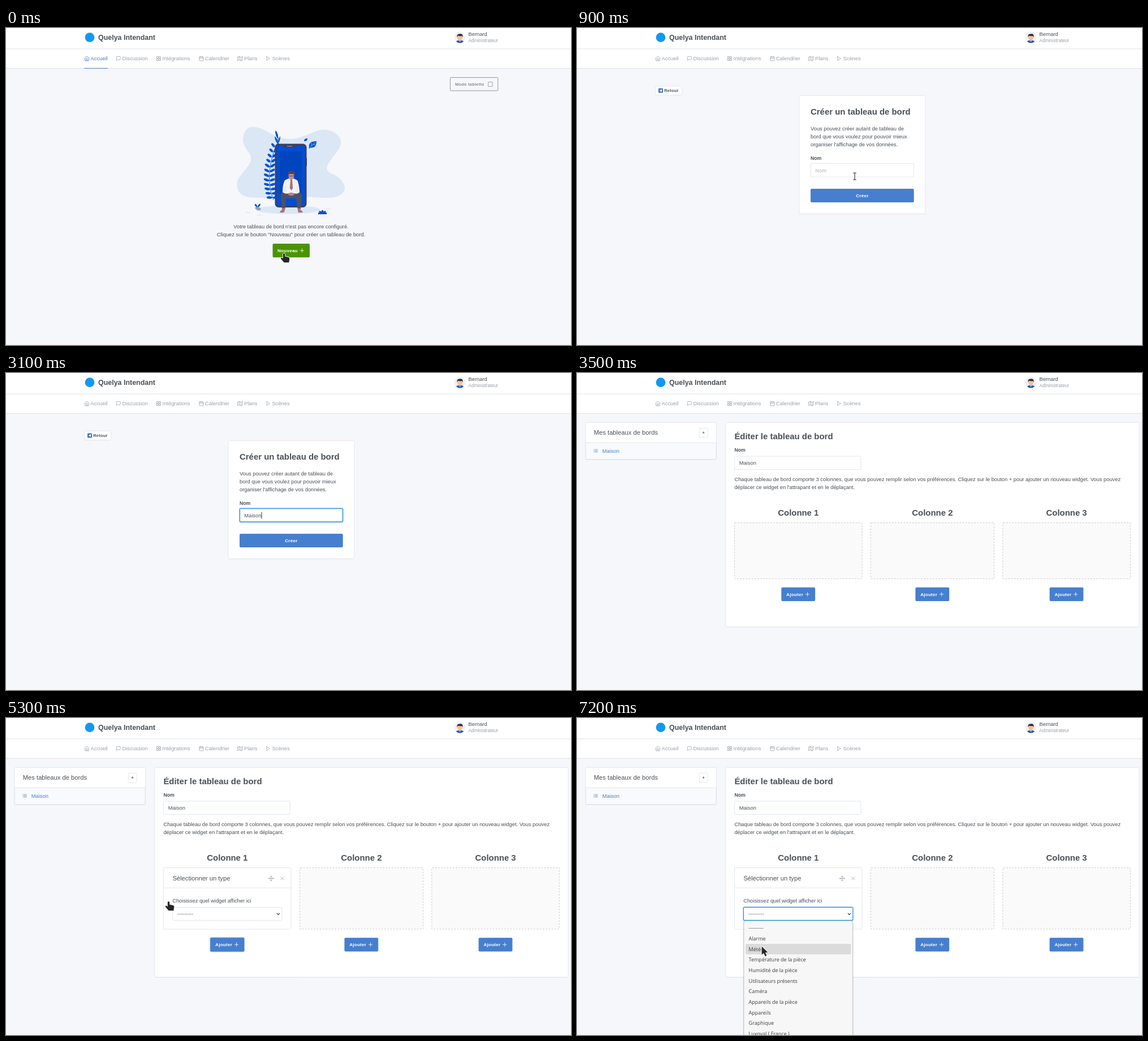
Animation of 999 by 560 pixels, one loop 8000 ms. Source, as an HTML page with a canvas:

```html
<!DOCTYPE html>
<html lang="fr">
<head>
<meta charset="utf-8">
<title>Tableau de bord</title>
<style>
html, body { margin: 0; width: 100%; height: 100%; overflow: hidden; background: #f5f7fb; }
canvas { display: block; width: 999px; height: 560px; }
</style>
</head>
<body>
<canvas id="stage"></canvas>
<script>
const W = 999, H = 560, LOOP = 8000;
const BLUE = '#467fcf', TEXT = '#495057', MUTED = '#9aa0ac', LINE = '#dde2ea', FOCUS = '#1991eb';
const INK = '#0051d6', BLOB = '#dbe7f4';
const SANS = '"Liberation Sans", Arial, sans-serif';
const LIST = '"Open Sans", "Noto Sans", sans-serif';
const BODY = 9.33, HEAD = 14.93, CARD = 11.2, BTN = 8.09, SMALL = 7.47;

const canvas = document.getElementById('stage');
const c = canvas.getContext('2d');
const dpr = window.devicePixelRatio || 1;
canvas.width = W * dpr;
canvas.height = H * dpr;

const ICONS = {
  home: 'M3 9l9-7 9 7v11a2 2 0 0 1-2 2H5a2 2 0 0 1-2-2zM9 22V12h6v10',
  chat: 'M21 15a2 2 0 0 1-2 2H7l-4 4V5a2 2 0 0 1 2-2h14a2 2 0 0 1 2 2z',
  grid: 'M3 3h7v7H3zM14 3h7v7h-7zM14 14h7v7h-7zM3 14h7v7H3z',
  calendar: 'M5 4h14a2 2 0 0 1 2 2v14a2 2 0 0 1-2 2H5a2 2 0 0 1-2-2V6a2 2 0 0 1 2-2zM16 2v4M8 2v4M3 10h18',
  map: 'M1 6v16l7-4 8 4 7-4V2l-7 4-8-4-7 4zM8 2v16M16 6v16',
  play: 'M5 3l14 9-14 9V3z',
  plus: 'M12 4v16M4 12h16',
  list: 'M8 6h13M8 12h13M8 18h13M3 6h1M3 12h1M3 18h1',
  move: 'M5 9l-3 3 3 3M9 5l3-3 3 3M15 19l-3 3-3-3M19 9l3 3-3 3M2 12h20M12 2v20',
  close: 'M19 5L5 19M5 5l14 14',
  square: 'M3 2h18v20H3z'
};

const POINTERS = {
  hand: 'M-1.7 1.2Q0 -1.2 1.7 1.2V5.6L8 7Q10 7.6 9.8 10L8.8 16.2H0L-5.6 9.6Q-6 7.4 -4 7.6L-1.7 9.2Z',
  arrow: 'M0 0V14.8L3.5 11.7L6.1 17.4L8.7 16.2L6.2 10.7H10.8Z',
  beam: 'M-2.8 -6H-.7L0 -5.4L.7 -6H2.8M0 -5.4V5.4M-2.8 6H-.7L0 5.4L.7 6H2.8'
};

function txt(s, x, y, size, color, { bold = false, align = 'left', spacing = 0, font = SANS } = {}) {
  c.font = `${bold ? 'bold ' : ''}${size}px ${font}`;
  c.letterSpacing = spacing + 'px';
  c.textAlign = align;
  c.fillStyle = color;
  c.fillText(s, x, y + size * 0.36);
}

function box(x, y, w, h, r, fill, stroke, lw = 0.8) {
  c.beginPath();
  c.roundRect(x, y, w, h, r);
  if (fill) { c.fillStyle = fill; c.fill(); }
  if (stroke) { c.strokeStyle = stroke; c.lineWidth = lw; c.stroke(); }
}

function oval(x, y, rx, ry, fill, rot = 0) {
  c.beginPath();
  c.ellipse(x, y, rx, ry, rot, 0, Math.PI * 2);
  c.fillStyle = fill;
  c.fill();
}

function path(d, fill, stroke, lw = 1) {
  const p = new Path2D(d);
  if (fill) { c.fillStyle = fill; c.fill(p); }
  if (stroke) { c.strokeStyle = stroke; c.lineWidth = lw; c.stroke(p); }
}

// Icon centred on x, y, drawn on a 24 unit grid.
function icon(name, x, y, color, size = BODY) {
  c.save();
  c.translate(x - size / 2, y - size / 2);
  c.scale(size / 24, size / 24);
  c.lineCap = c.lineJoin = 'round';
  path(ICONS[name], null, color, 2);
  c.restore();
}

function rule(x, y, w, color = '#dce0e7', h = 0.9) {
  c.fillStyle = color;
  c.fillRect(x, y, w, h);
}

function card(x, y, w, h) {
  box(x, y + 0.9, w, h, 2, 'rgba(0,0,0,.07)');
  box(x, y, w, h, 2, '#fff', LINE);
}

function button(label, x, y, w, tx, fill, plus) {
  box(x, y, w, 24.3, 2, fill);
  txt(label, tx, y + 12.1, BTN, '#fff', { bold: true, spacing: 0.24 });
  if (plus) icon('plus', x + w - 13.6, y + 12.1, '#fff', 9.6);
}

// Closed smooth curve through the midpoints of the given points.
function blob(pts, fill) {
  const mid = (a, b) => [(a[0] + b[0]) / 2, (a[1] + b[1]) / 2];
  c.beginPath();
  c.moveTo(...mid(pts[pts.length - 1], pts[0]));
  pts.forEach((p, i) => c.quadraticCurveTo(...p, ...mid(p, pts[(i + 1) % pts.length])));
  c.fillStyle = fill;
  c.fill();
}

function header(home) {
  c.fillStyle = '#fff';
  c.fillRect(0, 0, W, 71);
  rule(0, 36.5, W);
  rule(0, 70.8, W);
  oval(148, 16.6, 8.4, 8.4, '#1398f2');
  txt('Quelya Intendant', 163, 16.5, 12.44, TEXT, { bold: true });
  avatar();
  txt('Bernard', 817.5, 11, BODY, TEXT);
  txt('Administrateur', 817.5, 22.5, 8.17, MUTED);
  [['home', 143, 'Accueil', 149.5], ['chat', 198.8, 'Discussion', 205.5],
   ['grid', 270, 'Intégrations', 276.6], ['calendar', 345.4, 'Calendrier', 351.8],
   ['map', 414, 'Plans', 421], ['play', 463.6, 'Scènes', 470.5]
  ].forEach(([name, ix, label, x], i) => {
    const color = home && i === 0 ? BLUE : MUTED;
    icon(name, ix, 54, color);
    txt(label, x, 54, BODY, color);
  });
  if (home) rule(138.3, 70.7, 41.5, BLUE, 1);
}

function avatar() {
  c.save();
  c.beginPath();
  c.arc(802.5, 16.5, 10, 0, Math.PI * 2);
  c.clip();
  c.fillStyle = '#eff1f4';
  c.fillRect(792, 6, 21, 21);
  oval(802.5, 25.5, 7.5, 4, '#1557cf');
  path('M800 19h5v3l-2.5 2.5-2.5-2.5z', '#f3a987');
  oval(802.5, 16.5, 4.4, 4.9, '#f9bd9b');
  path('M797.5 16.5Q796.5 10 802 10.4Q808.5 9 807.5 16.5L806 14Q802 14.5 799 13.5Z', '#2b2b35');
  c.restore();
}

function fern() {
  const at = (u, a, b, d) => (1 - u) ** 2 * a + 2 * u * (1 - u) * b + u * u * d;
  path('M473 304Q456 262 478 206', null, INK, 0.9);
  for (let i = 0; i < 12; i++) {
    const u = 0.05 + i * 0.082;
    const x = at(u, 473, 456, 478), y = at(u, 304, 262, 206);
    const tilt = 0.05 + i * 0.075, size = i < 8 ? 5 : 4.2;
    for (const side of [-1, 1]) {
      const a = tilt * side;
      oval(x + side * 5.6 * Math.cos(tilt), y - 5.6 * Math.sin(tilt), size, 2.2, INK, -a);
    }
  }
  path('M480 206Q483 194 478 182', null, INK, 0.8);
  path('M481 196Q476 191 476 181Q482 187 481 196ZM482 206Q475 200 475 191Q482 198 482 206ZM481 204Q481 196 485 191Q485 200 481 204Z', INK);
}

function illustration() {
  blob([[419, 187], [430, 173], [455, 178], [480, 194], [510, 197], [535, 188], [560, 177], [587, 186],
    [595, 207], [575, 231], [563, 252], [590, 263], [603, 285], [583, 302], [530, 297], [460, 300],
    [415, 299], [405, 272], [424, 250], [437, 230], [419, 207]], BLOB);
  oval(499, 321, 57, 7.5, BLOB);
  fern();

  path('M536 211Q534 200 549 200Q549 212 539 211.5L535 213Z', INK);
  path('M537 211L547 202M540 208V203M543 206L547 206', null, BLOB, 0.6);
  path('M527 200Q527 195 533 195Q533 200 528 200Z', INK);

  rule(530, 229.5, 2, '#3a3d5c', 14);
  box(477, 206, 53, 109.5, 5, '#004ed2', '#3b3f63', 3);
  box(484, 218, 39, 76, 0, '#0045bd');
  box(490, 206.5, 24, 4.5, 2, '#3b3f63');
  rule(497, 208.3, 9, '#a9a9bd', 1);

  // Seated figure
  path('M489 289Q485 291 486 299L488 320H493.5L495 301H513L515.5 320H521L523 299Q523 291 518 289Z', '#4f5068');
  path('M488 318h5v3l-1 4.5q-5 1.5-8 0q0-2 3.5-3.5zM515.5 318h5v3.5q4 1.5 4 4q-4 1.5-8 0z', '#a9727b');
  path('M499 266L493 269Q489 276 489 290Q494 294 500 292H509Q516 294 519 290Q518 274 515 269L509 266Z', '#f1f1f6');
  path('M493.5 279V290M515 279V290', null, '#d3d4de', 0.7);
  path('M503 267h3l1.2 16-2.7 4-2.7-4z', '#a9727b');
  oval(504.4, 293.5, 5.5, 2.8, '#b9828a');
  oval(504.4, 261.5, 5, 6.5, '#c48e95');
  path('M498.3 260Q496 253 504 252.5Q513 252.5 510.5 260L508 258H501Z', '#5b4350');
  path('M500 261.5h9', null, '#3b3f63', 0.9);

  // Ground details
  oval(445.5, 319, 5.2, 2.8, '#9a9db1', 0.3);
  path('M444.5 317Q439 315 440 310.5Q445 312 444.5 317ZM445 317Q445 311 450 310.5Q450 315 445 317Z', INK);
  path('M552 326Q559 323.5 567 326V329H552Z', INK);
  oval(559.5, 324, 2, 2.6, INK);
  oval(556, 325, 3, 1.3, INK, 0.5);
  oval(563, 325, 3, 1.3, INK, -0.5);
  [[424, 325.5], [443, 330], [566, 319]].forEach(([x, y]) => rule(x, y, 8.5, '#dcdfe7', 1));
}

function homePage() {
  box(785.4, 87.4, 84.4, 23.4, 1.5, null, '#868e96', 0.9);
  txt('Mode tablette', 794, 99.2, SMALL, '#868e96', { bold: true, spacing: 0.28 });
  icon('square', 856.6, 99.3, '#868e96');
  illustration();
  txt("Votre tableau de bord n'est pas encore configuré.", 504, 350.8, BODY, TEXT, { align: 'center' });
  txt('Cliquez sur le bouton "Nouveau" pour créer un tableau de bord.', 504, 364.8, BODY, TEXT, { align: 'center' });
  button('Nouveau', 471.5, 381, 65.5, 480, '#4b9400', true);
}

function createPage(t) {
  box(138.5, 102.8, 47, 16.4, 2, 'rgba(0,0,0,.06)');
  box(138.5, 102.4, 47, 16, 2, '#fff', LINE);
  box(144, 106.4, 8, 8, 1, '#3c78c3');
  path('M150 108v5l-4.4-2.5z', '#fff');
  txt('Retour', 154.2, 110.8, SMALL, TEXT, { bold: true, spacing: 0.22 });

  card(392.9, 119.4, 222.8, 208.8);
  txt('Créer un tableau de bord', 413, 147.8, HEAD, TEXT, { bold: true });
  ['Vous pouvez créer autant de tableau de', 'bord que vous voulez pour pouvoir mieux',
   "organiser l'affichage de vos données."
  ].forEach((s, i) => txt(s, 413, 178 + i * 14, BODY, TEXT));
  txt('Nom', 413, 229.6, 8.71, TEXT, { bold: true });

  box(413.2, 239.3, 182.3, 23.8, 2, '#fff', LINE, 0.9);
  const focus = Math.min(1, Math.max(0, (t - 1100) / 300));
  if (focus) {
    c.globalAlpha = focus;
    box(413.2, 239.3, 182.3, 23.8, 2, null, 'rgba(70,127,207,.3)', 2.4);
    box(413.2, 239.3, 182.3, 23.8, 2, null, FOCUS, 1.1);
    c.globalAlpha = 1;
  }
  const typed = t < 2100 ? '' : 'Maison'.slice(0, 1 + Math.floor((t - 2100) / 200));
  if (typed) {
    txt(typed, 421.3, 251.5, BODY, TEXT);
    rule(421.5 + c.measureText(typed).width, 245.5, 0.9, '#222', 12);
  } else {
    txt('Nom', 421.3, 251.5, BODY, '#adb5bd');
  }

  box(413, 284, 182.7, 24, 2, BLUE);
  txt('Créer', 504.4, 296, BTN, '#fff', { bold: true, spacing: 0.24, align: 'center' });
}

function editPage(t) {
  const added = t >= 4500, grow = added ? 9.4 : 0;

  card(15, 87.4, 231.5, 65.4);
  box(15.4, 123, 230.6, 29.4, 0, '#f8fafd', LINE);
  txt('Mes tableaux de bords', 29.8, 105.3, CARD, TEXT);
  box(216.2, 97.4, 15, 16.4, 1.5, '#fff', LINE);
  txt('+', 223.6, 105.6, SMALL, TEXT, { bold: true, align: 'center' });
  icon('list', 33, 137.4, BLUE, 9);
  txt('Maison', 44.8, 138, BODY, BLUE);

  card(262.9, 87.4, 731, 361 + grow);
  txt('Éditer le tableau de bord', 278.4, 111.5, HEAD, TEXT, { bold: true });
  txt('Nom', 278.4, 136.3, 8.71, TEXT, { bold: true });
  box(278.6, 147, 223.4, 23.6, 2, '#fff', LINE, 0.9);
  txt('Maison', 286.8, 158.6, BODY, TEXT);
  txt('Chaque tableau de bord comporte 3 colonnes, que vous pouvez remplir selon vos préférences. Cliquez sur le bouton + pour ajouter un nouveau widget. Vous pouvez', 278.4, 187.6, BODY, TEXT);
  txt("déplacer ce widget en l'attrapant et en le déplaçant.", 278.4, 201.6, BODY, TEXT);

  [[278.5, 225.5, 391.3], [519.4, 218.2, 628.4], [752.8, 225.6, 865.6]].forEach(([x, w, mid], i) => {
    txt('Colonne ' + (i + 1), mid, 247, HEAD, TEXT, { bold: true, align: 'center' });
    if (added && i === 0) {
      widget(t);
    } else {
      c.setLineDash([2.6, 2.6]);
      box(x, 264.5, w, 99 + grow, 1, '#fafafa', '#bcbcbc', 0.8);
      c.setLineDash([]);
    }
    const by = 378.8 + grow, bx = mid - 30;
    if (i === 0 && t >= 4400) box(bx - 0.9, by - 0.9, 61.6, 26.1, 3, 'rgba(70,127,207,.5)');
    const hover = i === 0 && t >= 4300 && t < 4700;
    button('Ajouter', bx, by, 59.8, bx + 8.8, hover ? '#316cbe' : BLUE, true);
  });
  if (t >= 5800) dropdown(t);
}

function widget(t) {
  box(278.5, 264.5, 225.4, 108.6, 2, '#fff', LINE, 0.9);
  rule(278.5, 299.7, 225.4, LINE, 0.8);
  txt('Sélectionner un type', 294.4, 283, CARD, TEXT);
  icon('move', 468.8, 283.4, MUTED, 10.5);
  icon('close', 488.4, 283.4, MUTED, 9);
  txt('Choisissez quel widget afficher ici', 294.2, 322.8, BODY, TEXT);
  const focus = t >= 5700;
  if (focus) box(294.4, 334.4, 193.4, 23, 2, null, 'rgba(70,127,207,.3)', 2.4);
  box(294.4, 334.4, 193.4, 23, 2, '#fff', focus ? FOCUS : LINE, focus ? 1.1 : 0.9);
  txt('---------', 302.8, 346, BODY, TEXT);
  path('M479 345l2.4 2.4 2.4-2.4', null, '#333', 1.1);
}

function dropdown(t) {
  box(293.8, 358.6, 194.8, 220, 4, 'rgba(0,0,0,.1)');
  box(294.8, 358.3, 192.8, 220, 4, '#f7f7f7', '#b4b4b4', 0.8);
  const row = t < 6300 ? 0 : t < 7000 ? 1 : 2;
  box(298, 361.8 + row * 18.65, 186.6, 18.3, 3, '#dbdbdb');
  ['---------', 'Alarme', 'Météo', 'Température de la pièce', 'Humidité de la pièce', 'Utilisateurs présents',
   'Caméra', 'Appareils de la pièce', 'Appareils', 'Graphique', 'Luxoval ( France )'
  ].forEach((s, i) => txt(s, 303.6, 371.2 + i * 18.65, 9, '#3d3d3d', { font: LIST }));
}

// Pointer way-points: time, x, y.
const TRACK = [
  [0, 491.5, 398], [100, 491.5, 397], [300, 491, 399], [500, 491, 380], [700, 491, 315], [800, 491, 282],
  [900, 491, 262], [1000, 491, 255], [1100, 491, 252], [2100, 491, 252],
  [4300, 389, 396], [4500, 386, 394], [4800, 335, 358], [5000, 295, 331], [5100, 286, 325],
  [5300, 287.5, 324], [5500, 305, 336], [5700, 328, 346], [5900, 330, 347], [6000, 330, 348],
  [6100, 331, 362], [6200, 331, 378], [6300, 331, 383], [6400, 331, 386], [6800, 331, 386],
  [6900, 330, 390], [7000, 328, 397], [7100, 327, 402], [7200, 326.7, 403.5], [8000, 326.7, 403.5]
];

function pointerKind(t, y) {
  if (t < 300) return 'hand';
  if (t < 2100) return y < 264 ? 'beam' : y > 284 && y < 308 ? 'hand' : 'arrow';
  return t < 5600 ? 'hand' : 'arrow';
}

function pointer(t) {
  if (t >= 2100 && t < 4300) return;
  const i = TRACK.findIndex((p, n) => n === TRACK.length - 2 || t < TRACK[n + 1][0]);
  const [t0, x0, y0] = TRACK[i], [t1, x1, y1] = TRACK[i + 1];
  const k = (t - t0) / (t1 - t0);
  const x = x0 + (x1 - x0) * k, y = y0 + (y1 - y0) * k;
  const kind = pointerKind(t, y);
  c.save();
  c.translate(x, y);
  c.lineJoin = 'round';
  if (kind === 'beam') {
    path(POINTERS.beam, null, '#fff', 2.2);
    path(POINTERS.beam, null, '#2a2a2a', 1.1);
  } else {
    path(POINTERS[kind], null, '#fff', 1.8);
    path(POINTERS[kind], '#262626');
  }
  c.restore();
}

function frame(now) {
  const t = Math.floor((now % LOOP) / 100) * 100;
  c.setTransform(dpr, 0, 0, dpr, 0, 0);
  c.fillStyle = '#f5f7fb';
  c.fillRect(0, 0, W, H);
  header(t < 300);
  if (t < 300) homePage();
  else if (t < 3400) createPage(t);
  else editPage(t);
  pointer(t);
}

const start = performance.now();
function loop() {
  frame(performance.now() - start);
  requestAnimationFrame(loop);
}
loop();
</script>
</body>
</html>
```
